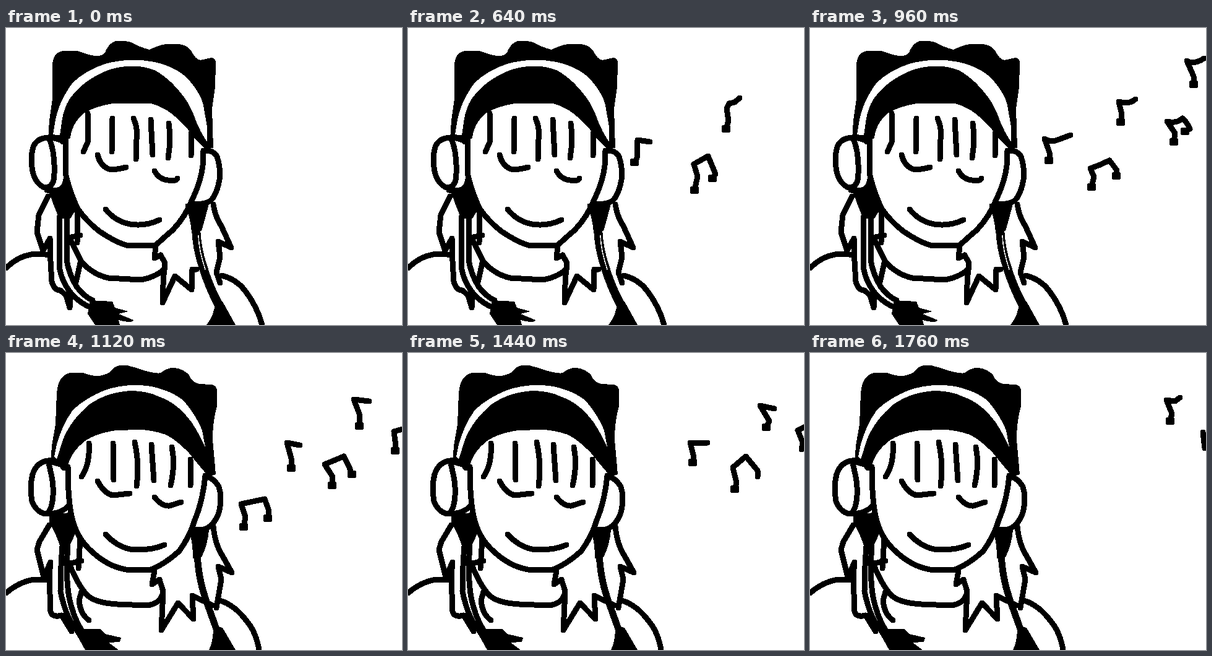
An HTML page without scripts that plays this animation: 640x480 px, repeating every 1.92 s.

```html
<!DOCTYPE html>
<html lang="en">
<head>
<meta charset="utf-8">
<title>Listening to music</title>
<style>
html, body { margin: 0; width: 100%; height: 100%; overflow: hidden; background: #fff; }
svg { display: block; width: 100vw; height: 100vh; }
.ink { fill: none; stroke: #000; stroke-width: 9; stroke-linecap: round; stroke-linejoin: round; }
.solid { fill: #000; stroke: none; }
.paper { fill: #fff; stroke: none; }
.eighth { marker-start: url(#head); }
.pair { marker-start: url(#head); marker-end: url(#head); }

/* Two poses swap every 160 ms; each step of notes lasts one pose. */
.pose { animation: swap 320ms step-end infinite; }
.sway { animation-delay: -160ms; }
.step { visibility: hidden; animation: show 1920ms step-end calc(var(--n) * 160ms - 1920ms) infinite; }
@keyframes swap { 0% { visibility: visible } 50%, 100% { visibility: hidden } }
@keyframes show { 0% { visibility: visible } 8.33333%, 100% { visibility: hidden } }
</style>
</head>
<body>
<svg viewBox="0 0 640 480" shape-rendering="crispEdges">
<defs>
  <marker id="head" markerUnits="userSpaceOnUse" markerWidth="14" markerHeight="12" refX="7" refY="6">
    <rect width="14" height="12" rx="3"/>
  </marker>
  <path id="e1" class="eighth" d="M386 214L388 204 379 179Q388 185 400 181L421 173"/>
  <path id="p2" class="pair" d="M455 257L459 240 453 227Q468 222 484 214L496 230 495 239"/>
  <path id="e3" class="eighth" d="M502 152L504 140 499 119Q516 124 526 115"/>
  <path id="p4" class="pair" d="M588 184L590 170 577 151Q592 155 602 146 610 153 614 163L606 167"/>
  <path id="e5" class="eighth" d="M620 91V78L609 53Q620 60 637 49"/>
  <path id="p1" class="pair" d="M384 281L387 265 380 244 418 236 425 255 423 267"/>
  <path id="e2" class="eighth" d="M461 186V170L454 145 475 149"/>
  <path id="p3" class="pair" d="M527 214L528 200 515 180 546 167 555 185 559 196"/>
  <path id="e4" class="eighth" d="M571 118V98L562 75 587 78"/>
</defs>

<g class="ink">
  <g class="pose">
    <path class="solid" d="M68 180L70 150 75 115V60Q76 38 94 37H116Q134 44 144 45 154 46 160 40 166 24 178 21 196 20 204 24 216 31 232 35 250 26 262 26H280Q294 28 300 38 306 50 314 52L332 48Q339 49 339 56L338 96 333 130 335 194 322 195Q304 180 294 164 278 145 260 133 240 122 232 122H172Q140 128 124 139 106 156 104 178L90 186Z"/>
    <path class="paper" d="M76 172L80 148Q86 118 108 88 130 68 160 58 200 47 240 55 272 62 292 80 314 104 319 125L325 160V184Q314 168 307 150 298 122 280 102 262 80 240 68 205 55 165 68 125 84 104 113 92 130 89 160L87 174Z"/>
    <!-- face -->
    <path d="M96 180V235Q104 268 116 292 128 310 150 328 175 345 194 351H242Q256 338 270 326 290 305 302 275 315 248 318 222L319 198"/>
    <path d="M132 138V185L125 200M172 146L171 200M206 146Q213 160 211 180L210 212M234 148L237 205M263 154Q267 180 262 210M299 170V206"/>
    <path d="M148 205Q152 222 166 228 176 230 194 225M240 231Q248 245 262 246 276 248 277 243M161 293Q176 312 200 317 226 321 248 310"/>
    <!-- headphones -->
    <path d="M68 177Q50 178 44 192 39 210 43 232 48 252 62 258 74 258 77 246 80 225 76 200 73 183 68 177L86 177 92 184M66 262L84 262Q94 260 97 245"/>
    <path d="M322 198Q336 198 341 208 347 224 345 245 341 268 331 279 320 286 302 284"/>
    <!-- hair and cord -->
    <path class="solid" d="M70 266L98 256Q104 278 114 292L104 308H86Q76 285 70 266ZM290 284H328Q320 315 316 328L300 330Q298 305 290 290Z"/>
    <path d="M68 272L53 302 50 330 60 360 71 340V360L74 410Q78 424 88 424L97 432 103 452 104 430"/>
    <path d="M86 306V385Q90 412 108 432 122 446 138 452M98 306V375Q102 398 114 418 126 434 140 440M116 292L115 347M105 338L120 335"/>
    <path d="M335 285Q338 305 348 320L364 355 343 345 346 370 340 395 346 412M242 352L240 372 250 367 257 380Q254 400 253 444L273 401 300 423 301 390 308 390"/>
    <path stroke-width="14" d="M307 324Q308 355 318 385 328 418 344 448"/>
    <path stroke="#fff" stroke-width="1.5" d="M311 336Q312 360 322 390"/>
    <!-- shoulders -->
    <path d="M104 342L122 378Q140 398 165 404L218 407Q245 402 257 388M120 380L113 411M0 388Q18 370 40 366 55 364 70 367M349 400Q372 406 386 424 406 450 414 480"/>
    <path class="solid" d="M136 440L172 442 176 452 198 458 182 462 206 472Q204 478 182 472L184 480H144L132 462ZM350 442L371 480H324Q336 465 338 445Z"/>
  </g>

  <g class="pose sway">
    <path class="solid" d="M72 180L74 150 80 115 82 65Q84 36 104 32H124Q142 38 150 37 168 34 172 26 180 18 196 20 212 24 226 29 244 34 250 32 262 23 272 24 288 26 296 36 300 47 312 50L332 51Q341 52 341 62V86Q334 110 334 140L339 196 328 200Q310 180 296 162 275 140 258 132 235 124 215 124L178 125Q145 130 128 142 105 160 100 182L92 186Z"/>
    <path class="paper" d="M78 168L82 148Q90 118 108 92 130 72 160 60 195 48 235 54 270 62 288 78 308 102 317 125L322 152Q312 130 300 112 280 85 256 74L246 70Q230 62 205 61 165 62 135 83 105 108 92 140L82 172Z"/>
    <!-- face -->
    <path d="M100 184Q100 235 106 264 114 300 140 322 165 345 194 350L232 351Q256 342 280 320 298 295 305 270 318 240 322 198"/>
    <path d="M134 146Q136 180 122 200M173 146L174 205M208 144Q216 180 211 215M235 148L239 206M268 152Q274 180 266 214M298 172V214"/>
    <path d="M148 207Q158 226 172 230L200 227M240 233Q252 248 264 247L283 241M161 293Q178 312 200 317 235 320 256 310"/>
    <!-- headphones -->
    <path d="M68 174Q50 176 43 196 38 215 42 240 50 258 64 260 72 258 75 240 78 220 74 200 70 182 68 174 84 172 94 186M66 260Q90 260 102 246"/>
    <path d="M322 200Q334 200 344 216 350 235 344 258 336 280 320 285L304 286"/>
    <!-- hair and cord -->
    <path class="solid" d="M70 262L102 258Q104 280 112 292L102 314H88Q78 285 70 276ZM296 286H328Q326 310 316 330L302 332Q302 306 296 286Z"/>
    <path d="M70 278L54 305 50 318 61 362 72 338 70 360 72 418Q75 428 90 424L106 450"/>
    <path d="M91 312Q88 350 88 385 96 425 112 445M100 312Q96 360 102 395 108 425 122 448M120 300L117 348M104 340L122 336M122 386L118 400Q120 422 134 432"/>
    <path d="M335 280Q338 310 350 328L365 355 343 345 348 366 340 412M240 352L236 374 248 366 254 385 251 448 278 404 303 430 301 392 334 408"/>
    <path stroke-width="11" d="M309 322Q310 360 322 396L340 446"/>
    <!-- shoulders -->
    <path d="M104 345Q118 378 132 392 145 404 180 406L228 408Q248 405 252 392M0 388Q18 372 40 367L68 366M346 400Q370 408 388 432 404 450 409 480"/>
    <path class="solid" d="M108 446H152L160 454 186 460 184 467 166 468 182 480H128L118 462ZM334 440L350 444 371 480H328Q337 460 334 440Z"/>
  </g>

  <g class="step" style="--n:2"><path class="eighth" d="M367 228L376 229 381 215 380 184 405 190"/></g>
  <g class="step" style="--n:3"><use href="#p1"/><use href="#e2" x="-8"/></g>
  <g class="step" style="--n:4">
    <path class="eighth" d="M366 217L370 210 371 181 391 184"/>
    <path class="pair" d="M463 262L468 240 462 220 485 207 497 236 492 243"/>
    <path class="eighth" d="M514 163L518 150 515 130 519 122 528 120 536 113"/>
  </g>
  <g class="step" style="--n:5"><use href="#p1"/><use href="#e2"/><use href="#p3"/><use href="#e4" x="-12"/></g>
  <g class="step" style="--n:6"><use href="#e1"/><use href="#p2"/><use href="#e3"/><use href="#p4"/><use href="#e5"/></g>
  <g class="step" style="--n:7">
    <use href="#p1"/><use href="#e2"/><use href="#p3"/><use href="#e4"/>
    <path class="eighth" d="M629 158L630 150 627 127 644 122"/>
  </g>
  <g class="step" style="--n:8"><use href="#e1"/><use href="#p2"/><use href="#e3"/><use href="#p4"/><use href="#e5"/></g>
  <g class="step" style="--n:9">
    <path class="eighth" d="M460 177L462 168 456 145 484 145"/>
    <path class="eighth" d="M528 220L531 210 525 185 546 167 565 190V200"/>
    <path class="eighth" d="M579 120L584 110 569 85 592 90"/>
    <path d="M636 156L638 145 630 125 642 119"/>
  </g>
  <g class="step" style="--n:10"><use href="#e3"/><use href="#p4"/><use href="#e5"/></g>
  <g class="step" style="--n:11">
    <path class="eighth" d="M582 110L585 98 576 76 590 78 598 72"/>
    <path d="M635 128L638 154"/>
  </g>
</g>
</svg>
</body>
</html>
```
